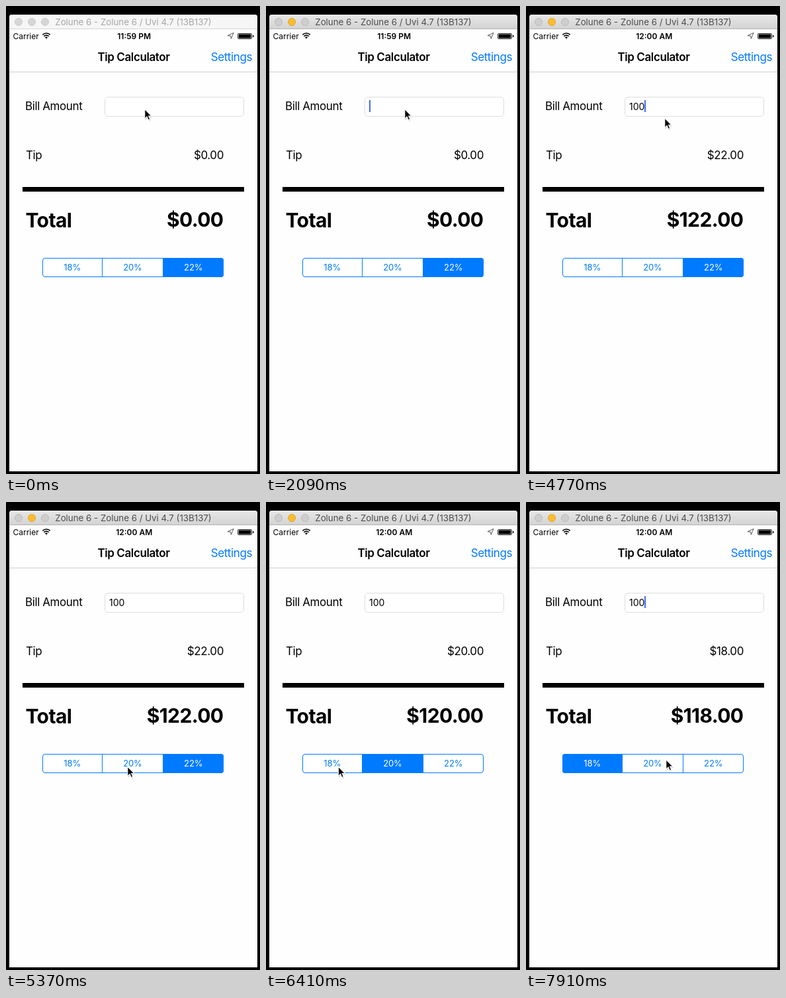
These frames come from a looping animation (384x706 px, 8 s). An HTML page:

```html
<!DOCTYPE html>
<html lang="en">
<head>
<meta charset="utf-8">
<title>Tip Calculator</title>
<style>
  html, body { margin: 0; width: 100%; height: 100%; overflow: hidden; background: #000; }
  svg { display: block; width: 100%; height: 100%; }
  text { font-family: Inter, Roboto, sans-serif; font-size: 17px; letter-spacing: -.4px; white-space: pre; }
  .mid { text-anchor: middle; }
  .end { text-anchor: end; }
  .semi { font-weight: 600; }
  .small { font-size: 12px; letter-spacing: 0; }
  .big { font-size: 30px; font-weight: 700; letter-spacing: -.6px; }
  .field { font-size: 14px; letter-spacing: -.05px; }
  .seg { font-size: 13px; letter-spacing: -.1px; }
  .bar { font-size: 13.3px; letter-spacing: 0; }
</style>
</head>
<body>
<svg viewBox="0 0 384 706">
  <defs>
    <linearGradient id="chrome" x2="0" y2="1">
      <stop stop-color="#e8e8e8"/><stop offset="1" stop-color="#d2d2d2"/>
    </linearGradient>
    <clipPath id="segClip"><rect x="55" y="380" width="274" height="29" rx="4"/></clipPath>
  </defs>
  <rect width="384" height="706"/>
  <path d="M5 702V17a4 4 0 0 1 4-4H376a4 4 0 0 1 4 4V702z" fill="#fefefe"/>

  <!-- window bar -->
  <path id="bar" d="M5 35V17a4 4 0 0 1 4-4H376a4 4 0 0 1 4 4V35z"/>
  <rect id="barLine" x="5" y="34" width="375" height="1"/>
  <g id="lights" stroke-width="1">
    <circle cx="19" cy="24" r="5.5"/><circle cx="39" cy="24" r="5.5"/><circle cx="59" cy="24" r="5.5"/>
  </g>
  <text id="barText" class="bar mid" x="192.5" y="29">Zolune 6 - Zolune 6 / Uvi 4.7 (13B137)</text>

  <!-- status bar -->
  <text class="small" x="10.5" y="49.5">Carrier</text>
  <g fill="none" stroke="#000" stroke-width="1.6">
    <path d="M55.3 43.4a8.1 8.1 0 0 1 11.4 0M57.3 45.7a5.2 5.2 0 0 1 7.4 0"/>
  </g>
  <path d="M61 49.5l-2-2.3a2.9 2.9 0 0 1 4 0z"/>
  <text id="clock" class="small semi mid" x="193.7" y="49.5"></text>
  <path d="M344 40.5L335 44.7L339.6 45.2L340.2 49.4z" fill="none" stroke="#444" stroke-width=".9" stroke-linejoin="round"/>
  <rect x="350.5" y="41.5" width="21" height="8" rx="1.5" fill="none" stroke="#000" stroke-width=".8"/>
  <rect x="351.7" y="42.6" width="18.6" height="5.8" rx=".5"/>
  <path d="M373 43.8a1.7 1.7 0 0 1 0 3.4z"/>

  <!-- navigation -->
  <text class="semi mid" x="193" y="83">Tip Calculator</text>
  <text class="end" x="372" y="83" fill="#007aff">Settings</text>
  <rect x="5" y="99" width="375" height="1" fill="#d0d0d0"/>

  <!-- form -->
  <text x="29" y="157">Bill Amount</text>
  <rect x="149.5" y="137.5" width="210" height="29" rx="4.5" fill="#fff" stroke="#dedede"/>
  <text id="bill" class="field" x="156" y="157"></text>
  <rect id="caret" y="142" width="2" height="18" fill="#426bf2"/>
  <text x="30" y="231">Tip</text>
  <text id="tip" class="end" x="329" y="231"></text>
  <rect x="25" y="273" width="335" height="7"/>
  <text class="big" x="29.5" y="334">Total</text>
  <text id="total" class="big end" x="328.5" y="333"></text>

  <!-- percentages -->
  <g id="segs" clip-path="url(#segClip)"></g>
  <path d="M145.5 380V409M237.5 380V409" stroke="#007aff"/>
  <rect x="55.5" y="380.5" width="273" height="28" rx="3.5" fill="none" stroke="#007aff"/>

  <g id="cursor">
    <path d="M1.3 2.5V18L4.8 14.8L7 19.3L9.6 18.2L7.6 13.6H12.3z" fill="#000" opacity=".18"/>
    <path d="M.8 1.2V15.6L4.1 12.5L6.3 17.6L8.8 16.6L6.6 11.6H11.1z" stroke="#fff" stroke-width="1.1"/>
  </g>
</svg>
<script>
const LOOP = 8000;
const $ = id => document.getElementById(id);

// Each step keeps the state before it, apart from what it names.
// fill: how blue each segment is; at: cursor place.
const steps = [
  [0, { active: false, clock: '11:59 PM', bill: '', rate: 22, caret: 0, fill: [0, 0, 1], at: [209, 154.5] }],
  [900, { active: true, caret: .5 }],
  [1050, { caret: 1 }],
  [1650, { caret: .5 }],
  [1800, { caret: 0 }],
  [2090, { caret: 1 }],
  [2540, { caret: .5 }],
  [2690, { caret: 0 }],
  [2830, { clock: '12:00 AM' }],
  [3130, { bill: '1', caret: 1 }],
  [3430, { bill: '10' }],
  [3570, { bill: '100' }],
  [4170, { caret: .5 }],
  [4320, { caret: 0 }],
  [4620, { caret: 1 }],
  [4770, { at: [209, 168] }],
  [4920, { at: [206, 265] }],
  [5070, { at: [198, 385], caret: .5 }],
  [5220, { at: [188, 424], caret: 0 }],
  [5370, { at: [183, 398] }],
  [5520, { fill: [0, .25, 1] }],
  [5670, { rate: 20, fill: [0, .33, .82], caret: .5 }],
  [5820, { fill: [0, 1, 0], caret: 1 }],
  [6270, { at: [140, 398], caret: .5 }],
  [6410, { at: [108.5, 398], caret: 0 }],
  [6710, { rate: 18, fill: [.33, .82, 0], caret: .5 }],
  [6860, { fill: [1, 0, 0], caret: 1 }],
  [7160, { caret: .5 }],
  [7310, { caret: 0 }],
  [7610, { caret: 1 }],
  [7760, { at: [165, 393] }],
  [7910, { at: [211, 387.5] }]
];
let last = {};
const states = steps.map(([time, change]) => ({ time, state: last = { ...last, ...change } }));

const caretX = [156, 161.5, 170, 179];
const money = n => '$' + n.toFixed(2);
const mix = (a, b, k) => `rgb(${a.map((v, i) => Math.round(v + (b[i] - v) * k))})`;
const blue = [0, 122, 255], white = [255, 255, 255];

function make(tag, attrs, parent) {
  const el = document.createElementNS('http://www.w3.org/2000/svg', tag);
  for (const key in attrs) el.setAttribute(key, attrs[key]);
  return parent.appendChild(el);
}

const edges = [55, 145.5, 237.5, 329];
const segs = ['18%', '20%', '22%'].map((label, i) => {
  const x = edges[i], width = edges[i + 1] - x;
  const box = make('rect', { x, y: 380, width, height: 29 }, $('segs'));
  const text = make('text', { class: 'seg mid', x: x + width / 2, y: 399 }, $('segs'));
  text.textContent = label;
  return { box, text };
});

function drawBar(active) {
  $('bar').setAttribute('fill', active ? 'url(#chrome)' : '#f6f6f6');
  $('barLine').setAttribute('fill', active ? '#b4b4b4' : '#d6d6d6');
  $('barText').setAttribute('fill', active ? '#4c4c4c' : '#a6a6a6');
  [...$('lights').children].forEach((light, i) => {
    const lit = active && i === 1;
    light.setAttribute('fill', lit ? '#fdbd2e' : active ? '#cecece' : '#d6d6d6');
    light.setAttribute('stroke', lit ? '#e0a32a' : active ? '#b9b9b9' : '#cacaca');
  });
}

function draw(s) {
  const bill = Number(s.bill), tip = bill * s.rate / 100;
  drawBar(s.active);
  $('clock').textContent = s.clock;
  $('bill').textContent = s.bill;
  $('tip').textContent = money(tip);
  $('total').textContent = money(bill + tip);
  $('caret').setAttribute('x', caretX[s.bill.length]);
  $('caret').setAttribute('opacity', s.caret);
  segs.forEach(({ box, text }, i) => {
    const k = s.fill[i];
    box.setAttribute('fill', mix(white, blue, k));
    text.setAttribute('fill', k > .5 ? mix(blue, white, k) : mix(blue, white, k));
  });
  $('cursor').setAttribute('transform', `translate(${s.at})`);
}

let shown;
function tick(now) {
  const t = now % LOOP;
  const { state } = states.findLast(step => step.time <= t) || states[0];
  if (state !== shown) draw(shown = state);
  requestAnimationFrame(tick);
}
draw(shown = states[0].state);
requestAnimationFrame(tick);
</script>
</body>
</html>
```
